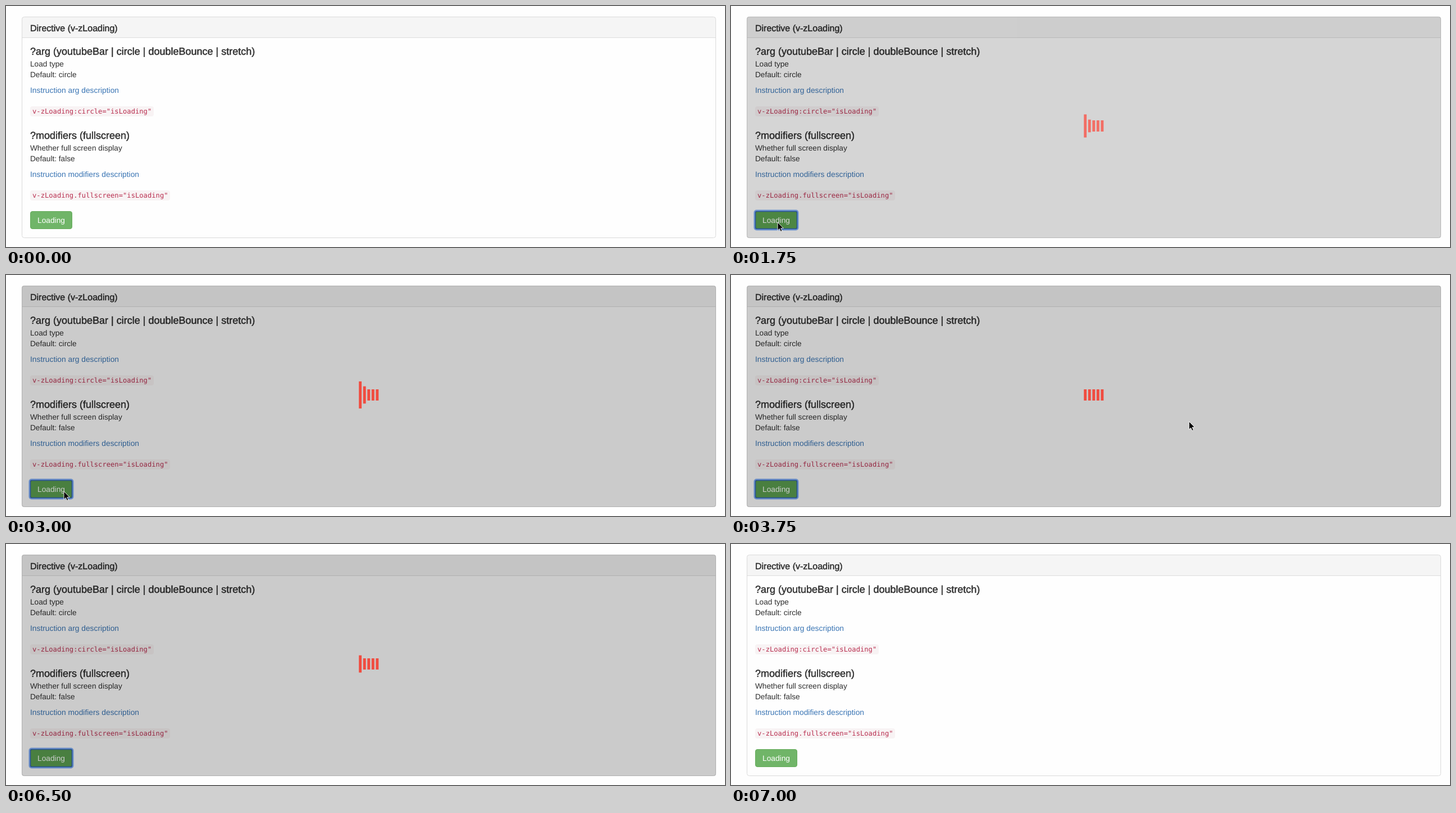
These frames come from a looping animation (1280 px wide and 430 px high, 7.5 s). An HTML page:

```html
<!DOCTYPE html>
<html lang="en">
<head>
<meta charset="utf-8">
<title>Loading directive</title>
<style>
  html, body { margin: 0; width: 100%; height: 100%; overflow: hidden; background: #fefefe; }
  svg { display: block; width: 1280px; height: 430px; }
  text { font: 13.65px "Liberation Sans", Arial, sans-serif; fill: #2f2f2f; text-rendering: geometricPrecision; }
  .title { font-size: 16px; stroke: #2f2f2f; stroke-width: .5px; }
  .head { font-size: 18px; stroke: #2f2f2f; stroke-width: .5px; }
  .link { font-size: 13.8px; fill: #3a75b4; }
  .code { font: 12.17px "DejaVu Sans Mono", monospace; fill: #b92f50; }
  .label { font-size: 13.75px; fill: #fff; text-anchor: middle; }
  .chip { fill: #f8f3f4; }
  .button { fill: #70b568; stroke: #66ac5c; }
  .hot .button { fill: #5b9f50; stroke: #4c8442; }
  .ring { display: none; fill: none; }
  .focused .ring { display: inline; }
</style>
</head>
<body>
<svg viewBox="0 0 1280 430">
  <rect x="28.5" y="19.5" width="1235" height="394" rx="4" fill="#fefefe"/>
  <path d="M28.5 56.5V23.5a4 4 0 0 1 4-4H1259.5a4 4 0 0 1 4 4V56.5Z" fill="#f5f5f5"/>
  <path d="M29 56.5H1263" stroke="#ddd"/>
  <rect x="28.5" y="19.5" width="1235" height="394" rx="4" fill="none" stroke="#dadada"/>

  <text class="title" x="43" y="44.7">Directive (v-zLoading)</text>

  <text class="head" x="43" y="87">?arg (youtubeBar | circle | doubleBounce | stretch)</text>
  <text x="43" y="108.2">Load type</text>
  <text x="43" y="126.5">Default: circle</text>
  <text class="link" x="43" y="154.6">Instruction arg description</text>
  <rect class="chip" x="43" y="179" width="220" height="18" rx="4"/>
  <text class="code" x="47" y="192.3">v-zLoading:circle="isLoading"</text>

  <text class="head" x="43" y="237">?modifiers (fullscreen)</text>
  <text x="43" y="258.2">Whether full screen display</text>
  <text x="43" y="276.5">Default: false</text>
  <text class="link" x="43" y="304.6">Instruction modifiers description</text>
  <rect class="chip" x="43" y="329" width="249" height="18" rx="4"/>
  <text class="code" x="47" y="342.3">v-zLoading.fullscreen="isLoading"</text>

  <g id="load">
    <rect class="button" x="43.5" y="366.5" width="74" height="31" rx="3.5"/>
    <rect class="ring" x="42" y="365" width="77" height="34" rx="3.5" stroke="#5b97f5" stroke-opacity=".75" stroke-width="3"/>
    <rect class="ring" x="43.5" y="366.5" width="74" height="31" rx="2" stroke="#2f62b4" stroke-width="1.5"/>
    <text class="label" x="80.5" y="386.6">Loading</text>
  </g>

  <g id="overlay">
    <rect x="28" y="19" width="1236" height="395" rx="4" fill-opacity=".2"/>
    <g id="bars" fill="#f04c40"></g>
  </g>

  <path id="cursor" d="M0 0V14.5L3.3 11.4 5.6 16.5 8 15.4 5.8 10.4H10.3Z" stroke="#fff" stroke-width=".9"/>
</svg>
<script>
const LOOP = 7500, STEP = 250;
const SHOW = 1600, HIDE = 6670, FADE = 300, PERIOD = 1200;
const $ = id => document.getElementById(id);
const clamp = v => Math.min(1, Math.max(0, v));

// CSS-style cubic Bézier timing, solved by bisection
function bezier(x1, y1, x2, y2) {
  const at = (a, b, s) => 3 * a * s * (1 - s) ** 2 + 3 * b * s * s * (1 - s) + s ** 3;
  return x => {
    let lo = 0, hi = 1;
    for (let i = 0; i < 20; i++) {
      const mid = (lo + hi) / 2;
      if (at(x1, x2, mid) < x) lo = mid; else hi = mid;
    }
    return at(y1, y2, lo);
  };
}
const ease = bezier(.25, .1, .25, 1);
const easeInOut = bezier(.42, 0, .58, 1);

const bars = Array.from({ length: 5 }, (_, i) => {
  const bar = document.createElementNS("http://www.w3.org/2000/svg", "rect");
  bar.setAttribute("x", 628.2 + 7.55 * i);
  bar.setAttribute("width", 4.9);
  return $("bars").appendChild(bar);
});

// Pointer route: time, x, y
const route = [
  [250, 235, 318], [500, 178, 362], [750, 126, 399], [1000, 98, 394], [1250, 83, 386],
  [2000, 83, 386], [2500, 101, 389], [2750, 101, 389], [3000, 103, 386],
  [3250, 190, 372], [4000, 1128, 206]
];

function pointer(t) {
  const i = route.findIndex(p => p[0] >= t);
  if (i < 0 || t < route[0][0]) return null;
  const b = route[i], a = route[i - 1] || b;
  const k = a === b ? 0 : (t - a[0]) / (b[0] - a[0]);
  return [a[1] + (b[1] - a[1]) * k, a[2] + (b[2] - a[2]) * k];
}

// Rises for a fifth of the period, falls for a fifth, then rests
function barHeight(t, i) {
  const phase = (t - SHOW - 100 * i + 10 * PERIOD) % PERIOD / (PERIOD / 5);
  return 20 + 30 * easeInOut(clamp(1 - Math.abs(phase - 1)));
}

function draw(t) {
  const opacity = ease(clamp((t - SHOW) / FADE)) - ease(clamp((t - HIDE) / FADE));
  $("overlay").setAttribute("opacity", opacity);
  bars.forEach((bar, i) => {
    const h = barHeight(t, i);
    bar.setAttribute("y", 214 - h / 2);
    bar.setAttribute("height", h);
  });

  const active = t < HIDE + FADE;
  $("load").classList.toggle("hot", t >= 1000 && active);
  $("load").classList.toggle("focused", t >= SHOW && active);

  const tip = pointer(t);
  $("cursor").style.display = tip ? "inline" : "none";
  if (tip) $("cursor").setAttribute("transform", `translate(${tip})`);
}

const start = performance.now();
function tick() {
  const t = (performance.now() - start) % LOOP;
  draw(Math.floor(t / STEP) * STEP);
  requestAnimationFrame(tick);
}
tick();
</script>
</body>
</html>
```
